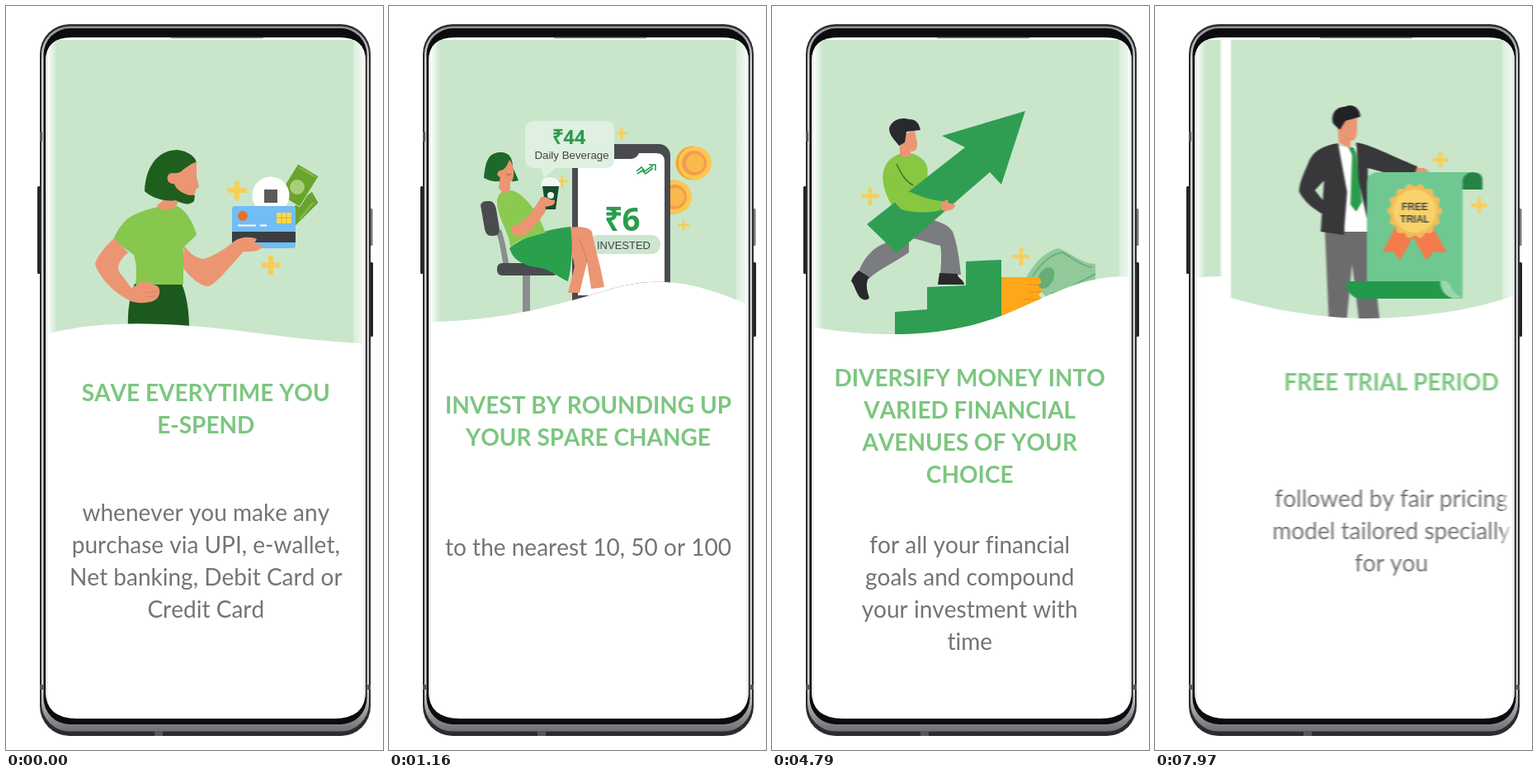
These frames come from a looping animation (457x900 px, 8000 ms). An HTML page:

```html
<!DOCTYPE html>
<html lang="en">
<head>
<meta charset="utf-8">
<title>Savings app walkthrough</title>
<style>
  html, body { margin: 0; width: 100%; height: 100%; overflow: hidden; background: #fff; }
  svg { display: block; width: 457px; height: 900px; }
  text { text-anchor: middle; }
  .title, .body { font: 28px Lato, sans-serif; font-kerning: none; font-variant-ligatures: none; fill: #747474; }
  .title { font-weight: 700; fill: #7cc680; }
  .label { font-family: "Liberation Sans", sans-serif; fill: #444; }
  .sum { font-family: "Open Sans", sans-serif; font-weight: 700; fill: #2a9c4c; }
  .skin { fill: #ec9573; }
  .plus { fill: none; stroke: #f6cf58; stroke-linecap: round; }
</style>
</head>
<body>
<svg viewBox="0 0 457 900">
  <defs>
    <clipPath id="screen"><path d="M48 67Q48 38 80 38H404Q436 38 436 67V828Q436 862 398 862H86Q48 862 48 828Z"/></clipPath>
    <clipPath id="wave0"><path d="M52 41H432V408C350 404 290 392 225 387C160 382 105 383 52 396Z"/></clipPath>
    <clipPath id="wave1"><path d="M52 41H432V360C375 336 330 325 270 342C200 363 140 380 52 382Z"/></clipPath>
    <clipPath id="wave2"><path d="M52 41H432V327C370 327 340 350 280 374C210 401 130 402 52 389Z"/></clipPath>
    <clipPath id="wave3"><path d="M52 41H432V336C370 365 290 378 210 378C150 376 100 367 52 353Z"/></clipPath>
    <filter id="blur" filterUnits="userSpaceOnUse" x="20" y="20" width="437" height="860" color-interpolation-filters="sRGB">
      <feGaussianBlur id="smear" stdDeviation="0 0"/>
    </filter>
    <linearGradient id="edgeL"><stop stop-color="#d8d8d8"/><stop offset=".25" stop-color="#fff" stop-opacity=".85"/><stop offset="1" stop-color="#fff" stop-opacity="0"/></linearGradient>
    <linearGradient id="edgeR"><stop stop-color="#fff" stop-opacity=".3"/><stop offset=".75" stop-color="#fff" stop-opacity=".7"/><stop offset="1" stop-color="#d4d4d4"/></linearGradient>
    <linearGradient id="rim" x2="0" y2="1"><stop stop-color="#8e9094"/><stop offset=".05" stop-color="#d0d2d5"/><stop offset=".94" stop-color="#d0d2d5"/><stop offset="1" stop-color="#6e7074"/></linearGradient>
  </defs>

  <!-- phone body -->
  <g fill="#222326">
    <rect x="38" y="218" width="4" height="106" rx="1.5"/>
    <rect x="441" y="245" width="3.5" height="45" rx="1.5" fill="#77797d"/>
    <rect x="441" y="310" width="4" height="90" rx="1.5"/>
    <rect x="41" y="22" width="401" height="861" rx="36" fill="#2b2c2f"/>
    <rect x="43" y="24.500" width="397" height="853" rx="34" fill="url(#rim)"/>
    <rect x="45.500" y="27" width="392" height="842" rx="32" fill="#0c0c0e"/>
    <path d="M41 152h3v12h-3zM41 821h4v6h-4zM438 821h4v6h-4zM180 877h10v6h-10z" fill="#55575b"/>
  </g>
  <g clip-path="url(#screen)">
    <rect x="48" y="38" width="388" height="824" fill="#fff"/>
    <g filter="url(#blur)"><g id="track">

      <g class="slide"><g clip-path="url(#wave0)">
        <rect x="52" y="41" width="380" height="370" fill="#c9e6cb"/>
        <!-- notes, coin, card -->
        <g fill="#69a52c" stroke="#c9e6cb">
          <path d="M371 224L379 238L351 266L340 250Z"/>
          <path d="M354 191L379 206L356 243L331 228Z"/>
        </g>
        <circle cx="353" cy="219" r="9" fill="#a9cf78"/>
        <path d="M355 195L375 207M356 258L372 238" stroke="#8cbb52" stroke-width="2"/>
        <circle cx="321" cy="229" r="22.5" fill="#fff"/>
        <rect x="313" y="222" width="16" height="16" fill="#5a5a5c"/>
        <rect x="274" y="242" width="77" height="51" rx="3.5" fill="#72bdf5"/>
        <path d="M274 273H351V286H274Z" fill="#3b3d43"/>
        <circle cx="287" cy="254" r="6" fill="#e8702d"/>
        <path d="M281 265.5H303M308 265.5H316" stroke="#fff" stroke-width="2"/>
        <rect x="328" y="250" width="18" height="13" rx="2" fill="#f8d94f"/>
        <path d="M328 256.5H346M334 250V263M340 250V263" stroke="#dca932" stroke-width=".8"/>
        <g class="plus" stroke-width="6"><path d="M271 223H289M280 214V232M312 313.500H330M321 304.500V322.500"/></g>
        <!-- woman -->
        <path class="skin" d="M216 290C224 301 231 305 240 306C252 302 264 295 275 286C284 278 298 279 304 282L301 287L311 290C310 296 299 298 288 297C274 312 258 333 246 339C236 340 223 328 214 316Z"/>
        <path d="M156 336H213C219 350 222 369 222 390H148C147 368 150 351 156 336Z" fill="#1c591d"/>
        <path d="M185 243C170 246 154 252 148 257C139 264 133 275 130 283L155 301C159 314 158 326 157 337H215V292L231 277C227 261 217 246 207 242Z" fill="#86c74d"/>
        <path class="skin" d="M131 281C119 292 110 304 108 312C112 327 130 346 149 356C157 360 169 360 178 357C187 354 188 343 184 339L169 333C162 331 158 340 152 341L139 324C134 317 135 310 148 298Z"/>
        <path d="M169 347L184 345M168 352L182 351" fill="none" stroke="#d57d60" stroke-width=".8"/>
        <path class="skin" d="M190 218H209V232C210 242 201 247 193 247C187 246 183 244 183 241L191 235Z"/>
        <path d="M168 224C169 198 181 175 207 174C220 175 230 182 231 190L222 194L216 207L219 226L229 229L228 236C223 242 212 239 206 235C193 237 178 233 168 224Z" fill="#1f5f1e"/>
        <path class="skin" d="M216 197C222 193 227 189 231 189L231 206L234 219L230 222C230 229 226 230 219 228C211 225 205 220 204 215C194 216 193 203 201 202C207 203 211 202 216 197Z"/>
      </g></g>

      <g class="slide"><g clip-path="url(#wave1)">
        <rect x="52" y="41" width="380" height="370" fill="#c9e6cb"/>
        <g id="coins"></g>
        <rect x="222" y="167" width="119" height="220" rx="14" fill="#4a4b4f"/>
        <path d="M229 350V188Q229 178 239 178H260Q264 185 271 185H293Q300 185 303 178H324Q334 178 334 188V350Z" fill="#fff"/>
        <path d="M300 200L306 195L310 200L320 193M301 203L307 199L311 203L320 196M315 192H323V199" fill="none" stroke="#2a9c4c" stroke-width="1.6"/>
        <rect x="242" y="277" width="87" height="23" rx="11" fill="#cce6cf"/>
        <text class="sum" x="282.500" y="272" font-size="38.500">₹6</text>
        <text class="label" x="284.500" y="293.500" font-size="13">INVESTED</text>
        <g class="plus" stroke-width="3"><path d="M276 154H288M282 148V160M204 212H216M210 206V218M351 265H363M357 259V271"/></g>
        <!-- chair -->
        <path d="M130 274C135 288 136 300 139 315H146C143 300 141 285 136 270ZM162 324H171V370H162Z" fill="#8b8d90"/>
        <path d="M111 241Q112 236 119 236H123Q128 237 130 246L134 270Q134 278 127 278H123Q118 278 116 270Z" fill="#4a4b4f"/>
        <rect x="131" y="311" width="74" height="15" rx="6" fill="#4a4b4f"/>
        <!-- woman -->
        <path class="skin" d="M208 282C222 296 224 308 225 315L217 347L231 347L240 310L245 342L261 340C256 312 249 290 246 273C240 265 222 267 207 270Z"/>
        <path d="M229 280Q237 293 240 310" fill="none" stroke="#d57d60" stroke-width="1"/>
        <path d="M146 293C160 281 185 271 220 267C223 286 222 313 217 333C204 328 197 318 178 316C160 313 150 306 146 293Z" fill="#2a9f4c"/>
        <path d="M154 225C166 231 180 249 188 270L190 274C177 278 155 282 147 292C146 273 131 257 131 236C131 225 143 219 154 225Z" fill="#8bc950"/>
        <path class="skin" d="M158 279C170 277 182 261 191 246L201 238C202 231 192 229 185 231L180 238L171 252L161 250L148 263L148 275Z"/>
        <path d="M147 231C153 245 163 249 171 252L155 266L146 264" fill="#8bc950"/>
        <path d="M115 208C117 190 119 178 134 177C144 176 150 182 150 195L157 211Q148 214 142 209C136 214 124 213 115 208Z" fill="#1d6929"/>
        <path class="skin" d="M135 206H147V221C145 228 137 228 133 220Z"/>
        <path class="skin" d="M146 186C152 193 152 205 150 210C147 215 138 212 136 207C130 207 130 200 135 199C141 198 143 193 146 186Z"/>
        <path d="M142 203Q145 206 148 203" fill="none" stroke="#ad543e"/>
        <path d="M186 218H206L202 246H190Z" fill="#164d2c"/>
        <path d="M184 218C184 210 190 207 195 207C203 207 207 211 208 218Z" fill="#f4f6f2"/>
        <circle cx="196" cy="229" r="4" fill="#eef3ec"/>
        <path class="skin" d="M183 232Q190 229 195 234L201 235Q202 241 194 242L184 244Z"/>
        <!-- bubble -->
        <path d="M176 139H262Q273 139 273 150V185Q273 196 262 196H202L188 208L184 196H176Q165 196 165 185V150Q165 139 176 139Z" fill="#dfefe0"/>
        <text class="sum" x="218" y="167" font-size="24">₹44</text>
        <text class="label" x="221.500" y="185" font-size="13.300">Daily Beverage</text>
      </g></g>

      <g class="slide"><g clip-path="url(#wave2)">
        <rect x="52" y="41" width="380" height="370" fill="#c9e6cb"/>
        <!-- note, coins, stairs -->
        <path d="M309 327C321 307 331 298 347 293C365 300 376 312 392 312V340L340 360Z" fill="#91c99b"/>
        <path d="M316 327C328 308 339 300 352 298C366 306 377 315 388 316M338 348C360 343 374 333 392 324" fill="none" stroke="#64aa73" stroke-width="1.500"/>
        <ellipse cx="332" cy="329" rx="9" ry="14" transform="rotate(28 332 329)" fill="#68ad78"/>
        <path d="M277 328H323L327 334L322 339L329 344L323 349L328 355L322 360V380H277Z" fill="#fea719"/>
        <path d="M308 337H325M312 346H326M305 355H326" stroke="#e98c12" stroke-width="1"/>
        <path d="M149 370L188 367V340L235 338V309L278 307V400H149Z" fill="#2f9e52"/>
        <g class="plus" stroke-width="4.500"><path d="M110 230H128M119 221V239M293 303H311M302 294V312"/></g>
        <!-- man -->
        <g fill="#7b7c7f">
          <path d="M139 286C123 292 113 302 105 321L117 330C130 318 151 309 166 298L166 280Z"/>
          <path d="M173 260L190 257C202 261 214 264 219 273C225 289 227 307 229 325H204C205 313 206 300 204 290C190 287 176 280 164 281Z"/>
        </g>
        <path d="M105 320L118 328C112 335 116 347 118 353Q114 358 107 353C102 348 100 337 96 333Q97 327 105 320ZM203 323L225 324C224 329 233 331 233 337H201Z" fill="#29292d"/>
        <path d="M152 180C167 174 183 181 188 194C190 207 188 219 180 227L151 251C139 233 132 215 135 200C138 189 142 185 152 180Z" fill="#87c742"/>
        <path d="M307 127L206 157L234 171L115 264L151 299L264 201L278 216Z" fill="#2f9e52"/>
        <path d="M136 199C144 213 152 221 165 224C180 230 192 235 206 236L204 247C188 251 168 250 157 246C147 238 137 219 135 205Z" fill="#87c742"/>
        <path d="M151 191C157 204 162 212 171 217" fill="none" stroke="#43772a" stroke-width="1.500"/>
        <path class="skin" d="M205 237L214 234L213 238L222 240Q222 247 211 248L205 247Z"/>
        <path class="skin" d="M154 158L173 150L176 166Q177 176 168 176L168 181Q159 185 155 179Z"/>
        <path d="M142 148C145 138 156 134 166 137C176 137 178 143 180 150L163 152L161 165L154 169C149 162 142 157 142 148Z" fill="#29292d"/>
      </g></g>

      <g class="slide"><g clip-path="url(#wave3)">
        <rect x="52" y="41" width="380" height="370" fill="#c9e6cb"/>
        <g transform="translate(-40)">
          <g class="plus" stroke-width="4.500"><path d="M338 186H354M346 178V194M385 241H401M393 233V249"/></g>
          <!-- man -->
          <path d="M206 268H260L273 385H248L239 312L232 385H211Z" fill="#6c6c6e"/>
          <path class="skin" d="M203 245L219 245Q223 254 215 255L203 253Z"/>
          <path d="M222 170H247L259 273H230Z" fill="#fff"/>
          <path d="M234 170L241 171L244 178L251 237L244 249L237 240L239 180Z" fill="#2a9c4c"/>
          <path d="M222 166C202 169 190 177 186 190C179 205 174 218 175 225C182 238 193 246 204 252L210 243L194 223L205 211L201 273L229 277L233 225Z" fill="#38383a"/>
          <path d="M244 165C262 168 284 180 318 194L317 203H284C269 199 263 197 258 196V262L247 211Z" fill="#38383a"/>
          <path class="skin" d="M317 197Q328 193 332 201L329 205H314ZM221 142L245 135V154Q243 164 237 163L237 173L223 165Z"/>
          <path d="M216 142C213 131 219 122 230 122C240 117 249 124 249 134L231 139L224 150Z" fill="#222225"/>
          <!-- scroll -->
          <path d="M373 222V211Q373 201 385 201Q397 201 397 211V222Z" fill="#258344"/>
          <path d="M269 201H384Q373 203 373 213V354H257V213Q257 203 269 201Z" fill="#6fc892"/>
          <path d="M232 333H346Q346 349 362 354H246Q233 350 232 333Z" fill="#239a4b"/>
          <path d="M346 333Q354 331 358 338Q365 353 374 351L362 354Q346 349 346 333Z" fill="#9bd6ae"/>
          <path d="M291 268L276 298L289 297L297 308L313 279L329 308L338 297L354 298L337 268Z" fill="#f37b4c"/>
          <path id="badge" fill="#f3bd59"/>
          <circle cx="315" cy="248" r="26" fill="#f8d36a"/>
          <g class="label" font-size="12" font-weight="700"><text x="315" y="247">FREE</text><text x="315" y="262">TRIAL</text></g>
        </g>
      </g></g>
    </g></g>
    <rect x="48" y="38" width="14" height="824" fill="url(#edgeL)"/>
    <rect x="421" y="38" width="15" height="824" fill="url(#edgeR)"/>
  </g>
  <path d="M200 38.500H312" stroke="#8a8c90" stroke-width="1.500"/>
</svg>
<script>
  const LOOP = 8000, STEP = 30, LEAD = 16, PITCH = 392, LENGTH = 702;
  const moves = [500, 4100, 7610];
  const $ = id => document.getElementById(id);
  const slides = [...document.querySelectorAll('.slide')];

  function add(parent, tag, attrs, text = '') {
    const el = document.createElementNS('http://www.w3.org/2000/svg', tag);
    for (const k in attrs) el.setAttribute(k, attrs[k]);
    el.textContent = text;
    parent.append(el);
  }

  const copy = [
    [242.3, 477.5, ['SAVE EVERYTIME YOU', 'E-SPEND'], 623,
      ['whenever you make any', 'purchase via UPI, e-wallet,', 'Net banking, Debit Card or', 'Credit Card']],
    [241.5, 493, ['INVEST BY ROUNDING UP', 'YOUR SPARE CHANGE'], 665, ['to the nearest 10, 50 or 100']],
    [239.7, 460, ['DIVERSIFY MONEY INTO', 'VARIED FINANCIAL', 'AVENUES OF YOUR', 'CHOICE'], 662,
      ['for all your financial', 'goals and compound', 'your investment with', 'time']],
    [246.7, 465, ['FREE TRIAL PERIOD'], 606, ['followed by fair pricing', 'model tailored specially', 'for you']]
  ];
  copy.forEach(([x, titleY, title, bodyY, body], i) => {
    const lines = (cls, y, list) =>
      list.forEach((s, n) => add(slides[i], 'text', { class: cls, x, y: y + 39 * n }, s));
    lines('title', titleY, title);
    lines('body', bodyY, body);
    slides[i].setAttribute('transform', `translate(${PITCH * i})`);
  });

  for (const [cx, cy] of [[346, 231], [370, 190]]) {
    const disc = (dx, r, fill) => add($('coins'), 'circle', { cx: cx + dx, cy, r, fill });
    disc(-2, 20.5, '#f5a632');
    disc(1, 20, '#fcc84f');
    disc(0, 15, '#f59b50');
    disc(1, 11, '#fab94b');
  }

  // scalloped rim
  let rim = '';
  for (let i = 0; i <= 120; i++) {
    const a = i * Math.PI / 60, r = 31.5 + 2 * Math.cos(14 * a);
    rim += `${i ? 'L' : 'M'}${315 + r * Math.cos(a)} ${248 + r * Math.sin(a)}`;
  }
  $('badge').setAttribute('d', rim + 'Z');

  // cubic-bezier(.2, 0, 0, 1): progress and slope
  function ease(x) {
    let lo = 0, hi = 1;
    for (let i = 0; i < 30; i++) {
      const s = (lo + hi) / 2;
      if (.6 * s * (1 - s) ** 2 + s ** 3 < x) lo = s; else hi = s;
    }
    const s = lo;
    return [s * s * (3 - 2 * s), 6 * s * (1 - s) / (.6 * (1 - s) * (1 - 3 * s) + 3 * s * s)];
  }

  function draw(t) {
    let shift = 0, speed = 0;
    for (const m of moves) {
      if (t < m) break;
      const at = Math.floor((t - m) / STEP) * STEP + LEAD;
      const [p, v] = at > LENGTH - STEP ? [1, 0] : ease(at / LENGTH);
      shift += p * PITCH;
      speed = v * PITCH / LENGTH;
    }
    $('track').setAttribute('transform', `translate(${-shift})`);
    $('smear').setAttribute('stdDeviation', `${(speed * 4.3).toFixed(2)} 0`);
    $('track').parentNode.setAttribute('filter', speed > .02 ? 'url(#blur)' : 'none');
  }

  function tick() {
    draw(performance.now() % LOOP);
    requestAnimationFrame(tick);
  }
  tick();
</script>
</body>
</html>
```
